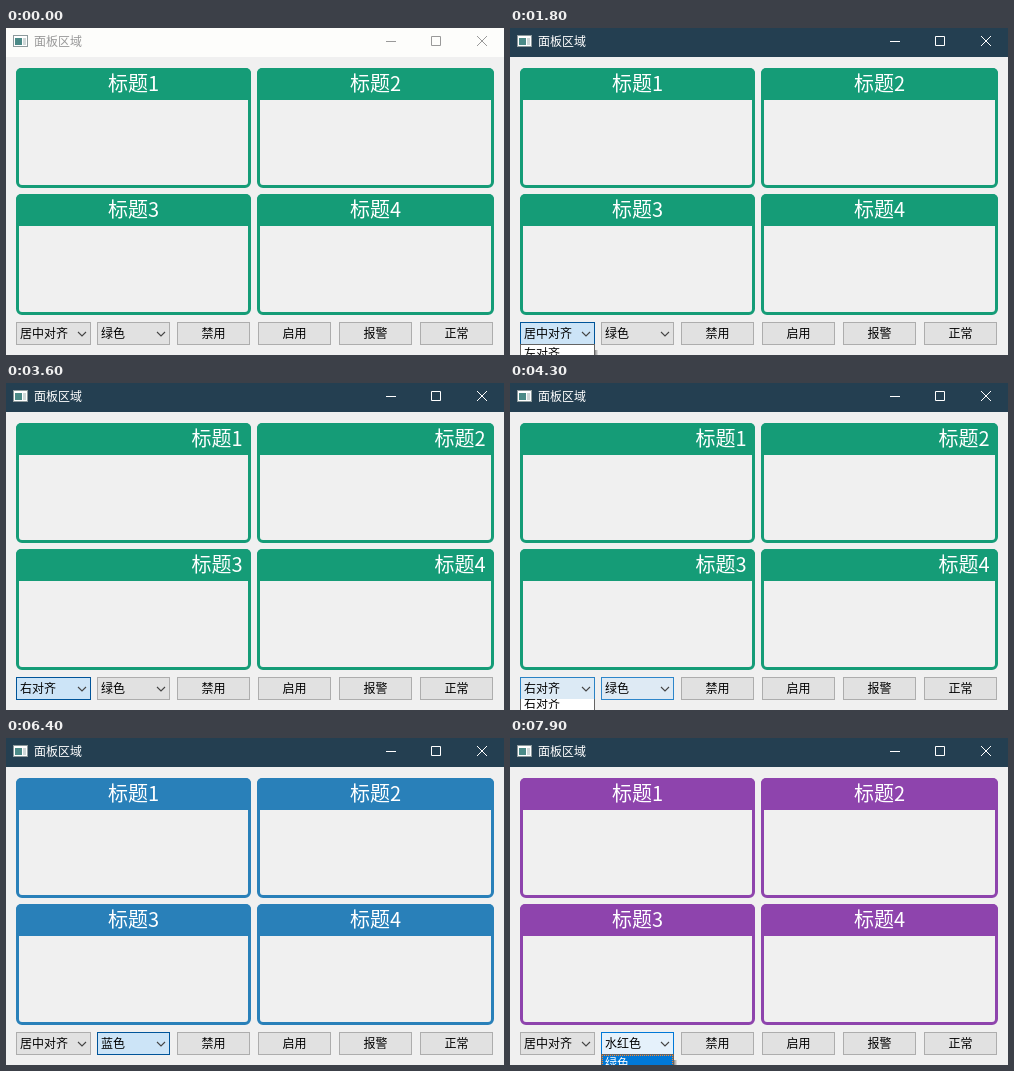
Animation of 498 by 327 pixels, one loop 8 s. Source, as an HTML page:

```html
<!DOCTYPE html>
<html lang="zh-CN">
<head>
<meta charset="utf-8">
<title>面板区域</title>
<style>
  html, body { margin: 0; width: 100%; height: 100%; overflow: hidden; }
  * { box-sizing: border-box; }
  body {
    position: relative; background: #f0f0f0; color: #000;
    font: 12px/20px "Noto Sans CJK SC", "Noto Sans CJK", sans-serif;
    white-space: nowrap;
  }
  div, svg, span { position: absolute; }

  /* every animated part shares one clock; values hold until the next key */
  .bar, .panels, .head, .ctl, .val, .popup, .roll, .shadow, .first {
    animation: none 8s step-end infinite;
  }

  .bar {
    left: 0; top: 0; width: 498px; height: 29px; line-height: 26px;
    animation-name: activate;
  }
  .bar span { left: 28px; }
  .bar svg { left: 0; top: 0; }

  .panels { inset: 0; animation-name: tint; }
  .panel {
    height: 120px; border: 3px solid currentColor; border-radius: 6px;
  }
  .head {
    left: -3px; right: -3px; top: -3px; height: 32px; padding: 0 8.5px;
    background: currentColor; border-radius: 5px 5px 0 0;
    font-size: 20px; line-height: 30px;
    animation-name: align;
  }
  .head b { color: #fff; font-weight: 400; }

  .ctl {
    top: 294px; height: 23px; width: 73px;
    background: #e1e1e1; border: 1px solid #adadad; text-align: center;
  }
  .val { left: 3px; top: 0; opacity: 0; }
  .ctl svg { right: 3px; top: 8px; }

  .popup { top: 316px; height: 11px; width: 80px; overflow: hidden; opacity: 0; }
  .roll {
    left: 0; top: 0; height: 47px;
    background: #fff; border: 1px solid #646464;
  }
  .roll div {
    left: 0; width: 100%; height: 15px; line-height: 15px; padding-left: 3px;
  }
  .roll div:nth-child(2) { top: 15px; }
  .roll div:nth-child(3) { top: 30px; }
  .roll .first { top: 0; outline: 1px dotted transparent; outline-offset: -1px; }
  .shadow {
    top: 322px; width: 3px; height: 5px; opacity: 0;
    background: linear-gradient(90deg, #8a8a8a, #e4e4e4);
  }

  @keyframes activate {
    0% { background: #fdfdfb; color: #999; }
    12.5%, 100% { background: #243f51; color: #fff; }
  }
  @keyframes tint {
    0% { color: #159c77; }
    80% { color: #2980b9; }
    92.5%, 100% { color: #8e44ad; }
  }
  @keyframes align {
    0% { text-align: center; }
    30% { text-align: left; }
    45% { text-align: right; }
    65%, 100% { text-align: center; }
  }

  /* control fades: normal #e1e1e1, hover #e5f1fb, pressed #cce4f7 */
  @keyframes combo-a {
    0% { background: #e1e1e1; border-color: #adadad; }
    13.75% { background: #e1e1e1; border-color: #adadad; animation-timing-function: steps(2); }
    16.25% { background: #e5f1fb; border-color: #0078d7; }
    20% { background: #d8eaf9; border-color: #0066b8; }
    22.5% { background: #cce4f7; border-color: #005499; }
    30% { background: #cce4f7; border-color: #005499; animation-timing-function: steps(3); }
    33.75% { background: #e5f1fb; border-color: #0078d7; }
    37.5% { background: #d8eaf9; border-color: #0066b8; }
    40% { background: #cce4f7; border-color: #005499; }
    45% { background: #cce4f7; border-color: #005499; animation-timing-function: steps(3); }
    48.75% { background: #e5f1fb; border-color: #0078d7; }
    50% { background: #e5f1fb; border-color: #0078d7; animation-timing-function: steps(2); }
    52.5% { background: #e2e8ed; border-color: #7c9fbd; }
    53.75% { background: #dceaf5; border-color: #2a82c4; }
    55% { background: #e5f1fb; border-color: #0078d7; }
    57.5% { background: #d8eaf9; border-color: #0066b8; }
    58.75% { background: #cce4f7; border-color: #005499; }
    65% { background: #cce4f7; border-color: #005499; animation-timing-function: steps(2); }
    67.5% { background: #e5f1fb; border-color: #0078d7; }
    68.75% { background: #e1ebf3; border-color: #5690c0; }
    70% { background: #dfe6ec; border-color: #8ba5bc; }
    71.25%, 100% { background: #e1e1e1; border-color: #adadad; }
  }
  @keyframes combo-b {
    0% { background: #e1e1e1; border-color: #adadad; }
    50% { background: #e1e1e1; border-color: #adadad; animation-timing-function: steps(2); }
    52.5% { background: #e5f1fb; border-color: #0078d7; }
    53.75% { background: #deeaf4; border-color: #2d86ca; }
    55% { background: #e2e8ed; border-color: #7c9fbd; }
    57.5% { background: #e1e1e1; border-color: #adadad; }
    68.75% { background: #e3edf5; border-color: #4a90c6; }
    70% { background: #dde6ee; border-color: #7fa1bd; }
    71.25% { background: #e5f1fb; border-color: #0078d7; }
    73.75% { background: #d8eaf9; border-color: #0066b8; }
    77.5% { background: #cce4f7; border-color: #005499; }
    80% { background: #cce4f7; border-color: #005499; animation-timing-function: steps(3); }
    83.75% { background: #e5f1fb; border-color: #0078d7; }
    87.5% { background: #d8eaf9; border-color: #0066b8; }
    90% { background: #cce4f7; border-color: #005499; }
    92.5% { background: #cce4f7; border-color: #005499; animation-timing-function: steps(2); }
    95%, 100% { background: #e5f1fb; border-color: #0078d7; }
  }
  @keyframes brush {
    0% { background: #e1e1e1; border-color: #adadad; }
    68.75% { background: #e2e7eb; border-color: #84a2ba; }
    70% { background: #e4eef7; border-color: #4593cf; }
    71.25% { background: #e2e7eb; border-color: #84a2ba; }
    72.5%, 100% { background: #e1e1e1; border-color: #adadad; }
  }

  /* combo captions */
  @keyframes centre { 0% { opacity: 1; } 30% { opacity: 0; } 65%, 100% { opacity: 1; } }
  @keyframes left { 0% { opacity: 0; } 30% { opacity: 1; } 45%, 100% { opacity: 0; } }
  @keyframes right { 0% { opacity: 0; } 45% { opacity: 1; } 65%, 100% { opacity: 0; } }
  @keyframes green { 0% { opacity: 1; } 80%, 100% { opacity: 0; } }
  @keyframes blue { 0% { opacity: 0; } 80% { opacity: 1; } 92.5%, 100% { opacity: 0; } }
  @keyframes pink { 0% { opacity: 0; } 92.5%, 100% { opacity: 1; } }

  /* drop-down lists roll in from above */
  @keyframes open-a {
    0% { opacity: 0; }
    18.75% { opacity: 1; } 30% { opacity: 0; }
    36.25% { opacity: 1; } 45% { opacity: 0; }
    53.75% { opacity: 1; } 65%, 100% { opacity: 0; }
  }
  @keyframes roll-a {
    0% { transform: translateY(-35px); }
    20% { transform: none; } 30% { transform: translateY(-35px); }
    37.5% { transform: none; } 45% { transform: translateY(-35px); }
    55%, 100% { transform: none; }
  }
  @keyframes shade-a {
    0% { opacity: 0; }
    17.5% { opacity: 1; } 30% { opacity: 0; }
    35% { opacity: 1; } 45% { opacity: 0; }
    55% { opacity: 1; } 65%, 100% { opacity: 0; }
  }
  @keyframes pick-a {
    0% { background: #fff; color: #000; outline-color: transparent; }
    26.25% { background: #0078d7; color: #fff; outline-color: #ff8728; }
    43.75%, 100% { background: #fff; color: #000; outline-color: transparent; }
  }
  @keyframes open-b {
    0% { opacity: 0; }
    72.5% { opacity: 1; } 80% { opacity: 0; }
    86.25% { opacity: 1; } 92.5% { opacity: 0; }
    97.5%, 100% { opacity: 1; }
  }
  @keyframes roll-b {
    0% { transform: translateY(-35px); }
    73.75% { transform: none; } 80% { transform: translateY(-35px); }
    87.5% { transform: none; } 92.5% { transform: translateY(-35px); }
    98.75%, 100% { transform: none; }
  }
  @keyframes shade-b {
    0% { opacity: 0; }
    73.75% { opacity: 1; } 80% { opacity: 0; }
    85% { opacity: 1; } 92.5% { opacity: 0; }
    97.5%, 100% { opacity: 1; }
  }
  @keyframes pick-b {
    0% { background: #0078d7; color: #fff; outline-color: #ff8728; }
    77.5% { background: #fff; color: #000; outline-color: transparent; }
    97.5%, 100% { background: #0078d7; color: #fff; outline-color: #ff8728; }
  }
</style>
</head>
<body>
  <div class="bar">
    <svg width="498" height="29" fill="none" stroke="currentColor">
      <rect x="7.5" y="7.5" width="14" height="11" fill="#fff" stroke="#8d9a9c"/>
      <path d="M9 10h7v7h-7z" fill="#4b8a87" stroke="none"/>
      <path d="M17 10h3v7h-3z" fill="#cfd8d8" stroke="none"/>
      <path d="M380 13.5h10M425.5 8.5h9v9h-9zM471 8l10 10M481 8l-10 10"/>
    </svg>
    <span>面板区域</span>
  </div>

  <div class="panels">
    <div class="panel" style="left:10px;top:40px;width:235px"><div class="head"><b>标题1</b></div></div>
    <div class="panel" style="left:251px;top:40px;width:237px"><div class="head"><b>标题2</b></div></div>
    <div class="panel" style="left:10px;top:166px;width:235px;height:121px"><div class="head"><b>标题3</b></div></div>
    <div class="panel" style="left:251px;top:166px;width:237px;height:121px"><div class="head"><b>标题4</b></div></div>
  </div>

  <div class="ctl" style="left:10px;width:75px;animation-name:combo-a">
    <span class="val" style="animation-name:centre">居中对齐</span>
    <span class="val" style="animation-name:left">左对齐</span>
    <span class="val" style="animation-name:right">右对齐</span>
    <svg width="10" height="7" fill="none" stroke="#444" stroke-width="1.1"><path d="M1 1l4 4 4-4"/></svg>
  </div>
  <div class="ctl" style="left:91px;animation-name:combo-b">
    <span class="val" style="animation-name:green">绿色</span>
    <span class="val" style="animation-name:blue">蓝色</span>
    <span class="val" style="animation-name:pink">水红色</span>
    <svg width="10" height="7" fill="none" stroke="#444" stroke-width="1.1"><path d="M1 1l4 4 4-4"/></svg>
  </div>
  <div class="ctl" style="left:171px;animation-name:brush">禁用</div>
  <div class="ctl" style="left:252px">启用</div>
  <div class="ctl" style="left:333px">报警</div>
  <div class="ctl" style="left:414px">正常</div>

  <div class="shadow" style="left:85px;animation-name:shade-a"></div>
  <div class="popup" style="left:10px;animation-name:open-a">
    <div class="roll" style="width:75px;animation-name:roll-a">
      <div class="first" style="animation-name:pick-a">左对齐</div>
      <div>居中对齐</div>
      <div>右对齐</div>
    </div>
  </div>
  <div class="shadow" style="left:164px;animation-name:shade-b"></div>
  <div class="popup" style="left:91px;animation-name:open-b">
    <div class="roll" style="width:73px;animation-name:roll-b">
      <div class="first" style="animation-name:pick-b">绿色</div>
      <div>蓝色</div>
      <div>水红色</div>
    </div>
  </div>
</body>
</html>
```
